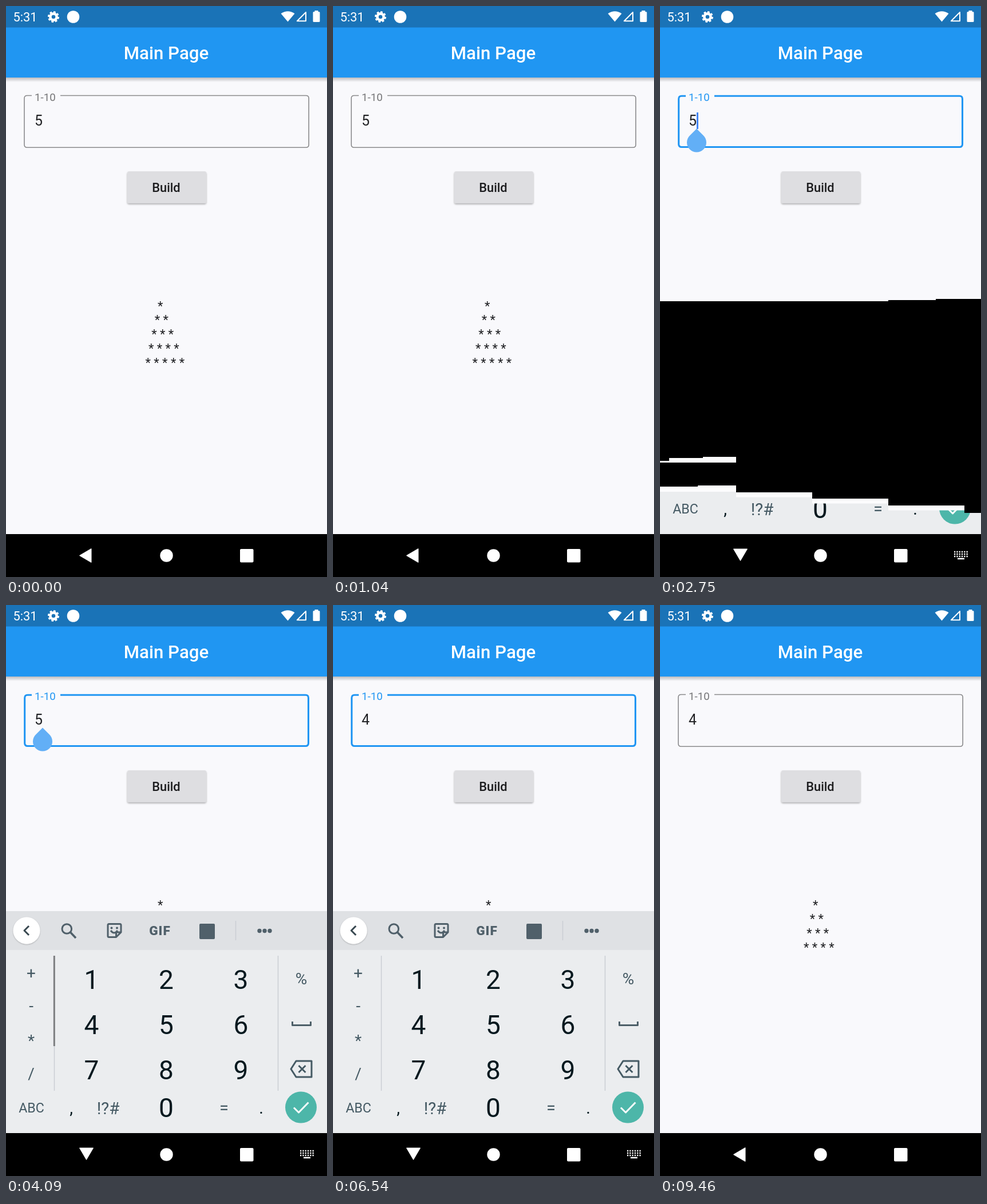
These frames come from a looping animation (561x998 px, 9.58 s). An HTML page:

```html
<!DOCTYPE html>
<html lang="en">
<head>
<meta charset="utf-8">
<title>Star pyramid</title>
<style>
  html, body { margin: 0; width: 100%; height: 100%; overflow: hidden; background: #f9f9fc; }
  svg { display: block; width: 100%; height: 100%; }
  text { font-family: Roboto, sans-serif; white-space: pre; }
  .mid { text-anchor: middle; }
  .medium { font-weight: 500; }
  .line { fill: none; stroke-linejoin: round; }
</style>
</head>
<body>
<svg viewBox="0 0 561 998" preserveAspectRatio="none">
  <defs>
    <linearGradient id="fade" x2="0" y2="1">
      <stop stop-color="#000" stop-opacity=".24"/>
      <stop offset="1" stop-color="#000" stop-opacity="0"/>
    </linearGradient>
    <filter id="soft" x="-10%" y="-20%" width="120%" height="150%">
      <feDropShadow dx="0" dy="2" stdDeviation="1.6" flood-opacity=".32"/>
    </filter>
    <filter id="round" x="-20%" y="-20%" width="140%" height="150%">
      <feDropShadow dx="0" dy="1" stdDeviation="1" flood-opacity=".25"/>
    </filter>
  </defs>

  <!-- page -->
  <rect width="561" height="998" fill="#f9f9fc"/>
  <rect y="125" width="561" height="8" fill="url(#fade)"/>
  <rect y="37" width="561" height="88" fill="#2096f2"/>
  <rect width="561" height="37.5" fill="#1a73b7"/>
  <text class="mid medium" x="280" y="93" font-size="31.2" fill="#fff">Main Page</text>

  <!-- status bar -->
  <g fill="#fff">
    <text x="12.5" y="27.3" font-size="21.8">5:31</text>
    <g class="line" stroke="#fff">
      <circle cx="83" cy="19" r="5.6" stroke-width="4.6"/>
      <circle cx="83" cy="19" r="8.4" stroke-width="3.2" pathLength="16" stroke-dasharray="1.1 .9"/>
      <path d="M524 11V26.3H508.8Z" stroke-width="2"/>
    </g>
    <circle cx="117.5" cy="19" r="10.8"/>
    <path d="M492.5 27.5L480.5 13.2Q492.5 5.5 504.5 13.2Z"/>
    <path d="M539.5 10V8H545.5V10H547Q548.5 10 548.5 11.5V26.5Q548.5 28 547 28H538Q536.5 28 536.5 26.5V11.5Q536.5 10 538 10Z"/>
  </g>

  <!-- input -->
  <path id="outline" class="line"/>
  <text id="label" x="50" y="166.4" font-size="18.7">1-10</text>
  <text id="value" x="50" y="209" font-size="24.9" fill="#202124"></text>
  <rect id="cursor" x="64" y="186" width="3" height="29" fill="#4285f4"/>
  <path id="handle" d="M64 214.5L76 226.5A17 17 0 1 1 52 226.5Z" fill="#62aff6"/>

  <rect x="212" y="289" width="138" height="55.5" rx="3" fill="#dedee1" filter="url(#soft)"/>
  <text class="mid medium" x="280" y="324.6" font-size="21.8" fill="#1c1c1e">Build</text>

  <g id="stars" fill="#202124" font-size="21.8"></g>

  <g id="keyboard">
    <rect y="535" width="561" height="388" fill="#ebedef"/>
    <rect y="535" width="561" height="68" fill="#dfe1e4"/>
    <circle cx="36" cy="569" r="23.5" fill="#fff" filter="url(#round)"/>
    <g class="line" stroke="#50606a" stroke-width="3">
      <path d="M40 561L32 569L40 577" stroke="#37474f"/>
      <circle cx="106.3" cy="566" r="8.3"/>
      <path d="M112.5 572L122 582" stroke-width="3.6"/>
      <path d="M180 557.5H199Q201 557.5 201 559.5V572L192.500 580.5H180Q178 580.500 178 578.500V559.500Q178 557.500 180 557.500ZM192.500 580V572H201"/>
      <path d="M183 569Q189 577 195 569"/>
      <path d="M500.500 728V734.500H532.500V728" stroke="#4d5f68"/>
      <path d="M507 797H534V825H507L498 811ZM511.500 805L523.500 817M523.500 805L511.500 817" stroke="#455a64"/>
    </g>
    <g fill="#50606a">
      <circle cx="184.500" cy="564.500" r="2"/>
      <circle cx="194" cy="564.500" r="2"/>
      <text class="mid" x="269" y="577" font-size="22.500" font-weight="900" letter-spacing="1">GIF</text>
      <rect x="338" y="557" width="27" height="27" rx="2"/>
      <circle cx="443" cy="569.500" r="3.700"/>
      <circle cx="452" cy="569.500" r="3.700"/>
      <circle cx="461" cy="569.500" r="3.700"/>
    </g>
    <path d="M401.500 552V586M84.500 613V849M475.500 613V849" stroke="#c9ced3" stroke-width="1.500"/>
    <rect id="thumb" x="82.800" y="613" width="3" height="158" fill="#7d7f81"/>
    <g id="keys"></g>
    <circle cx="515.500" cy="878" r="27.500" fill="#4db6a9"/>
    <path class="line" d="M503 878.500L511.500 887L528.500 869.500" stroke="#fff" stroke-width="3"/>
  </g>

  <!-- half-drawn keyboard -->
  <g id="gap">
    <path d="M0 516H399V514H482V512H561V886H532V873H399V861H266V850H133V840H0Z"/>
    <path fill="#fcfcfd" d="M0 795H16V790H75V788H133V798H0ZM0 840H66V838H133V849H0ZM133 850.500H266V858.500H133ZM266 861H399V869.500H266ZM399 873H532V881.500H399Z"/>
  </g>

  <!-- navigation bar -->
  <rect y="923" width="561" height="75"/>
  <g fill="#fff">
    <path id="back" stroke="#fff" stroke-linejoin="round"/>
    <circle cx="280.500" cy="960.500" r="11.200"/>
    <rect x="409" y="949" width="23.500" height="23.500" rx="2"/>
    <path id="switcher" class="line" stroke="#fff" stroke-width="2.500"
      d="M520 966H532"/>
    <path id="dots" class="line" stroke="#fff" stroke-width="2.300" stroke-dasharray="2.300 2"
      d="M514 954H538M514 958H538M514 962H538"/>
  </g>
</svg>
<script>
const $ = id => document.getElementById(id);
const LOOP = 9580, FOCUS = 2500, KEYS_IN = 2710, GAP_END = 2790,
      ERASE = 4700, TYPE = 5800, BUILD = 6300, KEYS_OUT = 7400;
const SPACE = 5.39, STAR = 14.8;

// Keys: text, centre x, baseline y, size, colour
const key = (text, x, y, size, color) =>
  `<text class="mid" x="${x}" y="${y}" font-size="${size}" fill="${color}">${text}</text>`;
const dark = "#06191f", grey = "#455a64";
let keys = key(0, 280, 895, 46, dark);
for (let i = 0; i < 9; i++)
  keys += key(i + 1, 149.5 + i % 3 * 130.5, 671 + (i / 3 | 0) * 79, 46, dark);
["+", "-", "*", "/"].forEach((c, i) => keys += key(c, 44, [653, 710, 771, 829][i], 28, grey));
keys += key("%", 516, 662.5, 28, grey) + key("ABC", 44.5, 887, 23.2, grey)
  + key(",", 114, 889, 29, dark) + key("!?#", 178.5, 889.5, 29.5, grey)
  + key("=", 381, 889, 29, grey) + key(".", 446, 889, 29, dark);
$("keys").innerHTML = keys;

const show = (id, on) => $(id).style.display = on ? "" : "none";
const ramp = (t, start, length) => Math.max(0, Math.min(1, (t - start) / length));
const mix = (a, b, k) => `rgb(${a.map((v, i) => Math.round(v + (b[i] - v) * k))})`;

function pyramid(rows) {
  const left = 280.5 - rows * STAR / 2;
  let out = "";
  for (let r = 1; r <= rows; r++)
    out += `<text x="${left + (rows - r) * SPACE}" y="${506.7 + r * 24.85}">${"* ".repeat(r)}</text>`;
  return out;
}

function frame(l, t, r, b) {
  const c = 5;
  return `M95 ${t}H${r - c}Q${r} ${t} ${r} ${t + c}V${b - c}Q${r} ${b} ${r - c} ${b}`
    + `H${l + c}Q${l} ${b} ${l} ${b - c}V${t + c}Q${l} ${t} ${l + c} ${t}H45`;
}

let rowsShown = 0;
function draw(t) {
  const open = t >= KEYS_IN && t < KEYS_OUT;
  const focused = t >= FOCUS && t < KEYS_OUT;
  const k = ramp(t, FOCUS, 150) - ramp(t, KEYS_OUT, 150);
  const inset = .7 * k;

  $("outline").setAttribute("d", frame(32 + inset, 156.5 + inset, 529.2 - inset, 247.2 - inset));
  $("outline").setAttribute("stroke", mix([138, 138, 140], [33, 150, 243], k));
  $("outline").setAttribute("stroke-width", 1.6 + 1.5 * k);
  $("label").setAttribute("fill", mix([117, 117, 119], [33, 150, 243], k));

  const value = t < ERASE ? "5" : t < TYPE ? "" : "4";
  $("value").textContent = value;
  const since = t - (t < ERASE ? FOCUS : t < TYPE ? ERASE : TYPE);
  show("cursor", focused && since % 1000 < 500);
  $("cursor").setAttribute("x", value ? 64 : 50);
  show("handle", focused && t < ERASE);

  const rows = t < BUILD ? 5 : 4;
  if (rows !== rowsShown) $("stars").innerHTML = pyramid(rowsShown = rows);

  show("keyboard", open);
  show("gap", t >= KEYS_IN && t < GAP_END);
  $("thumb").style.opacity = 1 - ramp(t, 4300, 250);
  show("switcher", open);
  show("dots", open);
  $("back").setAttribute("d", open ? "M128.500 949H152.500L140.500 969.500Z" : "M128.500 960.500L149 948.500V972.500Z");
}

const start = performance.now();
function tick() {
  draw((performance.now() - start) % LOOP);
  requestAnimationFrame(tick);
}
tick();
</script>
</body>
</html>
```
